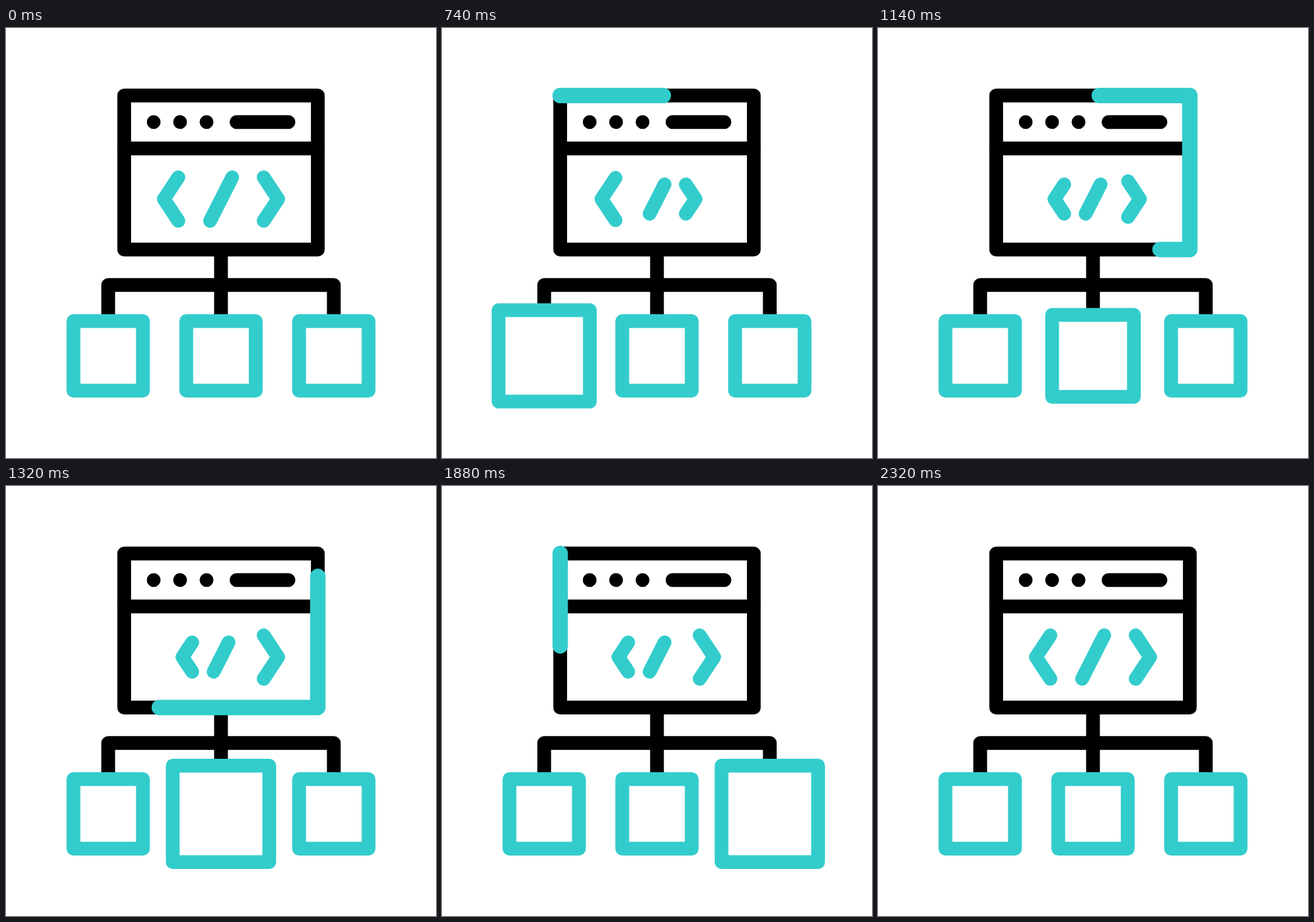
Recreate the animation shown at these times as an HTML page. Size 640 px wide and 640 px high, loop 2400 ms.

```html
<!DOCTYPE html>
<html lang="en">
<head>
<meta charset="utf-8">
<title>Code network</title>
<style>
  html, body { margin: 0; width: 100%; height: 100%; overflow: hidden; background: #fff; }
  svg { display: block; width: 100%; height: 100%; }
  path, rect { fill: none; stroke-width: 20.5; stroke-linecap: round; stroke-linejoin: round; }
  .ink { stroke: #000; }
  .teal { stroke: #3cc; }
  .box { fill: #fff; }
  #runner { stroke-width: 23; }
</style>
</head>
<body>
<svg viewBox="0 0 640 640">
  <g class="ink">
    <path d="M320 330V428" stroke-linecap="butt" style="stroke-linecap:butt"/>
    <path d="M152.1 428V382.4H487.9V428" style="stroke-linecap:butt"/>
    <rect x="175.9" y="100.5" width="288.2" height="229.2"/>
    <path d="M176 179.3H464"/>
    <path d="M219.8 139.9h.01M259.1 139.9h.01M298.5 139.9h.01M343.1 139.9H420.4"/>
  </g>
  <path id="runner" class="teal"/>
  <g class="teal">
    <path id="less"/>
    <path id="slash"/>
    <path id="greater"/>
    <rect class="box"/>
    <rect class="box"/>
    <rect class="box"/>
  </g>
</svg>
<script>
const LOOP = 2400, STEP = 20;
const BOX_Y = 488, BOX_HALF = 51.7;
const SMALL = 0.675;

const boxes = [
  { x: 152.1, grow: 17.3, times: [400, 690, 1023] },
  { x: 320, grow: 20.4, times: [1000, 1300, 1600] },
  { x: 487.9, grow: 20.4, times: [1600, 1900, 2200] }
];
const boxNodes = document.querySelectorAll(".box");

// Glyph points relative to the centre of the code symbol.
const CENTRE = [320, 254.6];
const glyphs = {
  less: [[-63.5, -32.4], [-85, 0], [-63.5, 32.4]],
  slash: [[16.7, -32.4], [-16.2, 32.4]],
  greater: [[63.5, -32.4], [85, 0], [63.5, 32.4]]
};

// Clockwise outline of the window, from its top left corner.
const corners = [[175.9, 100.5], [464.1, 100.5], [464.1, 329.7], [175.9, 329.7], [175.9, 100.5]];
const sides = corners.slice(1).map(([x, y], i) => Math.hypot(x - corners[i][0], y - corners[i][1]));
const perimeter = sides.reduce((a, b) => a + b);

const byId = id => document.getElementById(id);
const toPath = points => "M" + points.map(p => p.map(n => n.toFixed(2)).join(" ")).join("L");

function ease(t, from, to) {
  const s = Math.min(1, Math.max(0, (t - from) / (to - from)));
  return s * s * (3 - 2 * s);
}

const pulse = (t, [from, peak, to]) => ease(t, from, peak) - ease(t, peak, to);

function outlinePart(from, to) {
  const points = [];
  let passed = 0;
  sides.forEach((length, i) => {
    const a = Math.max(from, passed), b = Math.min(to, passed + length);
    if (b > a) {
      const at = d => corners[i].map((n, k) => n + (corners[i + 1][k] - n) * (d - passed) / length);
      if (!points.length) points.push(at(a));
      points.push(at(b));
    }
    passed += length;
  });
  return points.length ? toPath(points) : "";
}

function drawGlyph(id, size) {
  const scale = SMALL + (1 - SMALL) * size;
  byId(id).setAttribute("d", toPath(glyphs[id].map(p => p.map((n, k) => CENTRE[k] + n * scale))));
}

function render(t) {
  const base = 1 - ease(t, 200, 400);
  const restore = ease(t, 2150, 2325);
  drawGlyph("less", base + pulse(t, [400, 680, 1013]) + restore);
  drawGlyph("slash", base + restore);
  drawGlyph("greater", base + ease(t, 1000, 1300));

  byId("runner").setAttribute("d",
    outlinePart(perimeter * ease(t, 800, 2200), perimeter * ease(t, 400, 1800)));

  boxes.forEach(({ x, grow, times }, i) => {
    const half = BOX_HALF + grow * pulse(t, times);
    const attrs = { x: x - half, y: BOX_Y - half, width: 2 * half, height: 2 * half };
    for (const name in attrs) boxNodes[i].setAttribute(name, attrs[name]);
  });
}

const start = performance.now();
function tick() {
  const t = (performance.now() - start) % LOOP;
  render(Math.floor(t / STEP) * STEP);
  requestAnimationFrame(tick);
}
tick();
</script>
</body>
</html>
```
